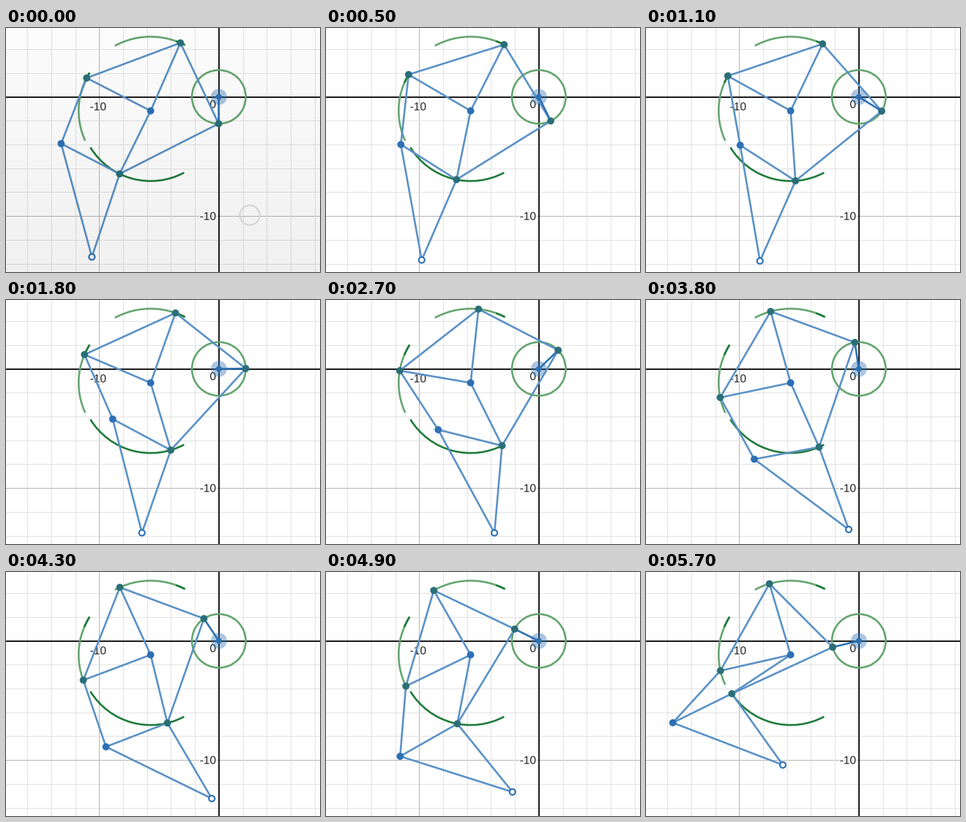
A matplotlib script that plays this animation: 429 by 335 pixels, repeating every 5.8 s.

```python
import numpy as np
import matplotlib.pyplot as plt
from matplotlib.animation import FuncAnimation
from matplotlib.patches import Arc, Circle
from matplotlib.patheffects import withStroke

W, H, DPI = 429, 335, 64
PX = 72 / DPI                      # one pixel in points
FRAMES, STEP_MS = 58, 100
UNIT = 16.35                       # pixels per graph unit
ORIGIN = np.array([290.8, 94.6])

BLUE, TEAL = "#2d70b3", "#2a6f78"
GREEN, DARK_GREEN = "#64a56f", "#1f7a3a"

# Jansen linkage lengths in pixels
SIZES = dict(a=38, b=41.5, c=39.3, d=40.1, e=55.8, f=39.4, g=36.7,
             h=65.7, i=49, j=50, k=61.9, l=7.8, m=15)
L = {name: 0.15 * UNIT * size for name, size in SIZES.items()}
PIVOT = ORIGIN + (-L["a"], L["l"])

fig = plt.figure(figsize=(W / DPI, H / DPI), dpi=DPI, facecolor="white")
ax = fig.add_axes([0, 0, 1, 1])
ax.set_axis_off()


def meet(p, rp, q, rq, side=1):
    """Corner at distance rp from p and rq from q."""
    gap = np.hypot(*(q - p))
    u = (q - p) / gap
    along = (rp**2 - rq**2 + gap**2) / (2 * gap)
    off = np.sqrt(max(rp**2 - along**2, 0))
    return p + along * u + side * off * np.array([-u[1], u[0]])


def linkage(deg):
    t = np.radians(deg)
    crank = ORIGIN + L["m"] * np.array([np.cos(t), -np.sin(t)])
    top = meet(crank, L["j"], PIVOT, L["b"])
    low = meet(crank, L["k"], PIVOT, L["c"], -1)
    left = meet(top, L["e"], PIVOT, L["d"])
    knee = meet(left, L["f"], low, L["g"])
    foot = meet(knee, L["h"], low, L["i"])
    return dict(origin=ORIGIN, pivot=PIVOT, crank=crank, top=top,
                low=low, left=left, knee=knee, foot=foot)


def grid():
    for n in range(-16, 10, 2):
        major = n % 10 == 0
        style = dict(color="#b4b4b4" if major else "#e2e2e2", lw=PX, zorder=1)
        ax.axvline(ORIGIN[0] + n * UNIT, **style)
        ax.axhline(ORIGIN[1] - n * UNIT, **style)
    ax.axvline(ORIGIN[0], color="#1c1c1c", lw=2 * PX, zorder=2)
    ax.axhline(ORIGIN[1], color="#1c1c1c", lw=2 * PX, zorder=2)
    ax.axhline(H - 0.5, color="#2a2a2a", lw=PX, zorder=2)


def label(x, y, text):
    ax.text(x, y, text, family="Liberation Sans", size=15.5 * PX,
            color="#222222", ha="right", va="baseline", zorder=3,
            path_effects=[withStroke(linewidth=3 * PX, foreground="white")])


def trace(center, r, start, end, color):
    # the y axis points down, so angles are mirrored
    ax.add_patch(Arc(center, 2 * r, 2 * r, theta1=-end, theta2=-start,
                     color=color, lw=2.6 * PX, zorder=4))


grid()
label(137, 113, "-10")
label(287, 110, "0")
label(287, 263.5, "-10")

trace(ORIGIN, L["m"], 0, 360, GREEN)
trace(PIVOT, L["b"], 62.5, 118.7, GREEN)
trace(PIVOT, L["b"], 62.5, 70, DARK_GREEN)
trace(PIVOT, L["d"], 147.9, 204.7, GREEN)
trace(PIVOT, L["d"], 147.9, 157, DARK_GREEN)
trace(PIVOT, L["c"], 211.4, 298.3, DARK_GREEN)

BARS = ["top left", "top pivot", "left pivot", "crank top", "crank low",
        "pivot low", "left knee", "knee low", "knee foot", "low foot",
        "origin crank"]
bars = {}
for name in BARS:
    color = BLUE if name == "origin crank" else "#5a91c6"
    bars[name], = ax.plot([], [], color=color, lw=2.6 * PX, zorder=5,
                          solid_capstyle="round")

ax.add_patch(Circle(ORIGIN, 11, fc=BLUE, ec="none", alpha=0.4, zorder=4.5))
JOINTS = dict(origin=(BLUE, 4), pivot=(BLUE, 4.9), knee=(BLUE, 4.9),
              crank=(TEAL, 4.9), top=(TEAL, 4.9), low=(TEAL, 4.9),
              left=(TEAL, 4.9))
dots = {name: ax.add_patch(Circle((0, 0), r, fc=color, ec="none", zorder=6))
        for name, (color, r) in JOINTS.items()}
dots["foot"] = ax.add_patch(Circle((0, 0), 4, fc="white", ec=BLUE,
                                   lw=2.1 * PX, zorder=6))

# grey veil and tap ring that fade out at the start
veil = np.zeros((H, 1, 4))
veil[:, 0, 3] = np.linspace(0.015, 0.06, H)
shade = ax.imshow(veil, extent=(0, W, H, 0), aspect="auto", zorder=7)
ring = ax.add_patch(Circle((333, 257), 13.5, fill=False, ec="#d6d6d6",
                           lw=2.2 * PX, zorder=8))
ax.set_xlim(0, W)
ax.set_ylim(H, 0)

KEY_FRAMES = [0, 11, 18, 27, 38, 49, 57]
KEY_ANGLES = [-90.5, -32, 0.8, 44.2, 98.6, 153.8, 193.5]


def draw(i):
    points = linkage(np.interp(i, KEY_FRAMES, KEY_ANGLES))
    for name, bar in bars.items():
        start, end = name.split()
        bar.set_data(*np.transpose([points[start], points[end]]))
    for name, dot in dots.items():
        dot.set_center(points[name])
    fade = max(0, 1 - i / 3)
    shade.set_data(veil * [1, 1, 1, fade])
    ring.set_alpha(fade)
    return [*bars.values(), *dots.values(), shade, ring]


anim = FuncAnimation(fig, draw, frames=FRAMES, interval=STEP_MS,
                     repeat=True, repeat_delay=0)
plt.show()
```
